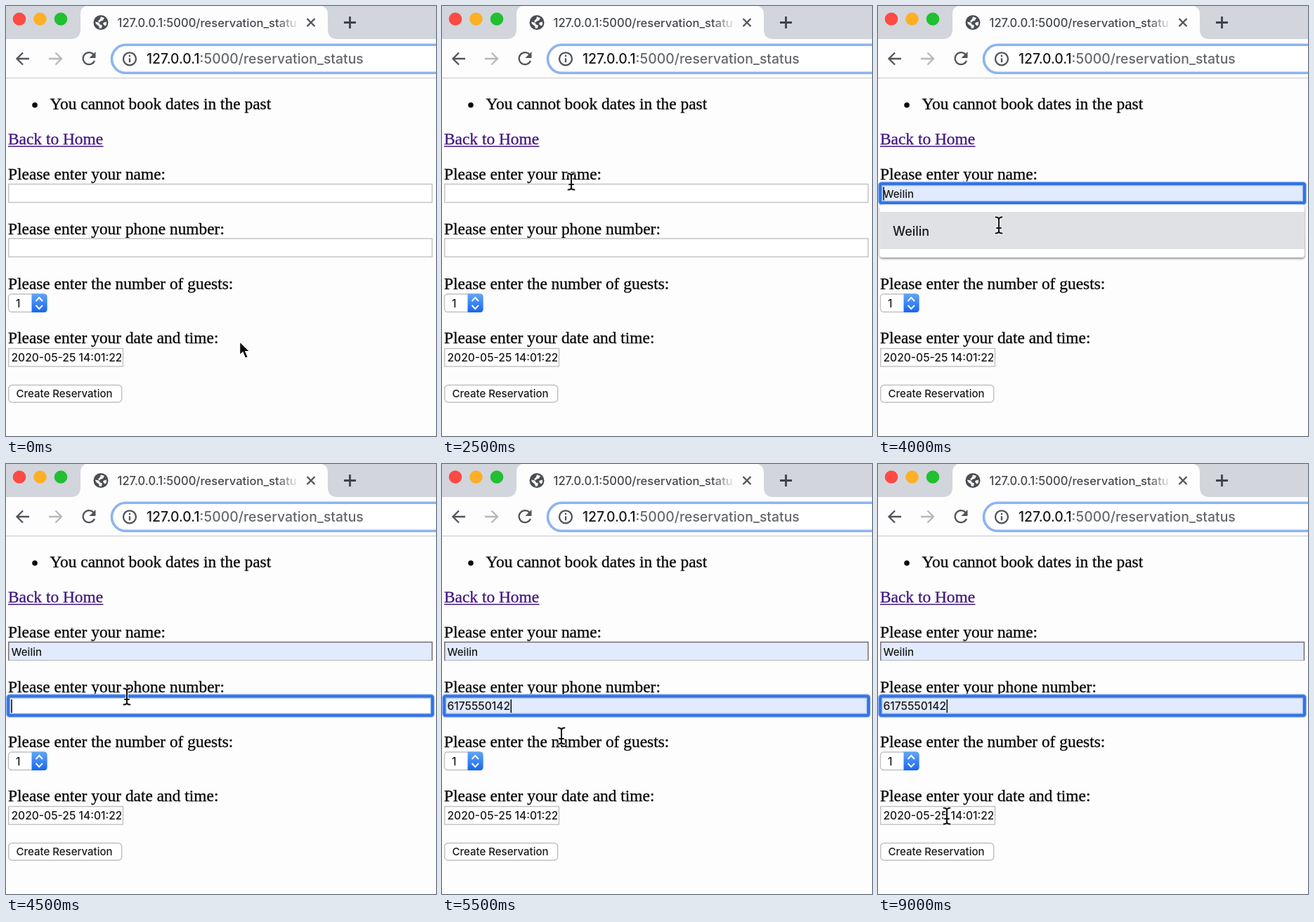
These frames come from a looping animation (612 by 612 pixels, 9500 ms). An HTML page:

```html
<!DOCTYPE html>
<html lang="en">
<head>
<meta charset="utf-8">
<title>Reservation form</title>
<style>
html, body { margin: 0; width: 100%; height: 100%; overflow: hidden; background: #fefdfe; }
svg { display: block; width: 612px; height: 612px; }
text { white-space: pre; }
.serif { font: 23.4px "Liberation Serif", Times, serif; fill: #0a0a0a; stroke: #0a0a0a; stroke-width: .35; }
.serif .link { fill: #431a80; stroke: #431a80; }
.sans { font: 500 15px Inter, Roboto, sans-serif; fill: #1a1a1c; }
.digits { font-size: 15.6px; }
.box { fill: #fff; stroke: #c0c0c4; stroke-width: 1.4; }
.line { fill: none; stroke: #515459; stroke-width: 2.3; }
.caret { stroke: #111; stroke-width: 1.6; }
.ring { fill: none; stroke: #3573e2; stroke-width: 4; }
.halo { fill: none; stroke: #9fbef5; stroke-width: 6.4; }
</style>
</head>
<body>
<svg viewBox="0 0 612 612">
  <defs>
    <linearGradient id="blue" x2="0" y2="1">
      <stop stop-color="#62a6f8"/><stop offset="1" stop-color="#1767ef"/>
    </linearGradient>
    <linearGradient id="fade">
      <stop stop-color="#fdfdfe" stop-opacity="0"/><stop offset="1" stop-color="#fdfdfe"/>
    </linearGradient>
    <filter id="shadow" x="-5%" y="-20%" width="110%" height="150%">
      <feDropShadow dx="0" dy="1.5" stdDeviation="1.8" flood-opacity=".5"/>
    </filter>
    <clipPath id="dateClip"><path d="M5 488H164V513H5z"/></clipPath>
    <path id="beamShape" d="M-4.500-11.500Q0-11.500 0-8Q0-11.500 4.500-11.500M0-8.500V8.500M-4.500 11.500Q0 11.500 0 8Q0 11.500 4.500 11.500M-3 4H3"/>
  </defs>

  <!-- Browser window -->
  <path fill="#d2d5dc" d="M0 0H612V47H0z"/>
  <path fill="#fdfdfe" d="M0 47H92Q106 47 106 33V12Q106 3 113 0H450Q458 3 458 12V33Q458 47 472 47H612V102H0z"/>
  <path stroke="#d4d5d8" stroke-width="1.6" d="M0 102.5H612"/>
  <circle cx="19" cy="18.5" r="9.3" fill="#fc4a44"/>
  <circle cx="48.5" cy="18.5" r="9.3" fill="#fdb025"/>
  <circle cx="78" cy="18.5" r="9.3" fill="#20c030"/>
  <g transform="translate(135 23.5)">
    <circle r="10.5" fill="#4a4e53"/>
    <path fill="#fdfdfe" d="M-8-1L-3 0L-1 3L2 4L1 8L-2 8.3L-3 5L-7 2zM0-8.3L5-6.5L3-3L0-2L-2 0L-4-2L-1-5zM4 0L8-1L8 3L6 5L3 2z"/>
  </g>
  <text class="sans" x="158.500" y="29.5" style="font-size:16.6px;fill:#45484d">127.0.0.1:5000/reservation_statu</text>
  <path fill="url(#fade)" d="M385 8H418V40H385z"/>
  <path fill="#fdfdfe" d="M417.500 8H426V40H417.500z"/>
  <path class="line" d="M428.500 18L439.500 29M439.500 18L428.500 29"/>
  <path class="line" style="stroke:#3f4246;stroke-width:2.8" d="M481 23.500H498M489.500 15V32"/>
  <path class="line" d="M33 75H16M24 66.500L15.500 75L24 83.500"/>
  <path class="line" style="stroke:#b6b8bb" d="M61 75H78M70.500 66.500L79 75L70.500 83.500"/>
  <path class="line" d="M124.500 69A8.500 8.500 0 1 0 126 78"/>
  <path fill="#515459" d="M127.500 65V74H118.500z"/>
  <rect x="150.500" y="55.300" width="520" height="40" rx="20" fill="#fff" stroke="#8bb4f3" stroke-width="3.600"/>
  <circle class="line" cx="176" cy="75.300" r="9"/>
  <path class="line" d="M176 74.300V80.300M176 69.800V72.300"/>
  <text class="sans" x="200" y="82" style="font-size:19.4px">127.0.0.1<tspan fill="#65686d">:5000/reservation_status</tspan></text>

  <!-- Page -->
  <circle cx="41" cy="141" r="3.800" fill="#0a0a0a"/>
  <g class="serif">
    <text x="62.500" y="147">You cannot book dates in the past</text>
    <text x="3" y="197" class="link">Back to Home</text>
    <text x="3" y="247">Please enter your name:</text>
    <text x="3" y="325">Please enter your phone number:</text>
    <text x="3" y="402.500">Please enter the number of guests:</text>
    <text x="3" y="480">Please enter your date and time:</text>
  </g>
  <path stroke="#431a80" stroke-width="1.500" d="M3 199.700H138.500"/>

  <g class="sans">
    <rect class="box" x="3.500" y="410" width="54.500" height="25.500" rx="4.500"/>
    <path fill="url(#blue)" d="M36.500 409.500H54Q58.500 409.500 58.500 414V431.500Q58.500 436 54 436H36.500z"/>
    <path class="line" style="stroke:#fff;stroke-width:1.900" d="M42.500 420L47.300 415L52 420M42.500 426L47.300 431L52 426"/>
    <text x="14" y="428.500" class="digits">1</text>
    <rect class="box" x="3.700" y="487.500" width="162.800" height="25.500"/>
    <text x="7.500" y="506.300" class="digits" clip-path="url(#dateClip)">2020-05-25 14:01:22</text>
    <rect class="box" x="3.700" y="539.500" width="161" height="24.500" rx="5"/>
    <text x="14.500" y="557.300">Create Reservation</text>
  </g>
  <g id="fields" class="sans"></g>

  <!-- Pointers -->
  <path id="arrow" fill="#0b0b0b" stroke="#fff" stroke-width="1.500" d="M0 0V19.500L4.500 15.500L8 24L12 22.300L8.500 14.200H14.500z"/>
  <g id="beam" fill="none" stroke-linecap="round">
    <use href="#beamShape" stroke="#fff" stroke-opacity=".8" stroke-width="4"/>
    <use href="#beamShape" stroke="#111" stroke-width="2"/>
  </g>
</svg>
<script>
const STEP = 500, STEPS = 19;
const NAME = "Weilin", PHONE = "6175550142";
const NAME_Y = 253.5, PHONE_Y = 331;

// Pointer places, one per step from the fifth on
const path = [
  [184, 250], [173, 262], [172, 268], [172, 312], [172, 331], [171, 388], [170, 387],
  [150, 470], [136, 497], [124, 503.5], [115, 505], [108, 505], [102, 503], [98, 501]
];
const caretOn = new Set([6, 8, 9, 10, 11, 13, 15, 18]);
const get = id => document.getElementById(id);
const place = (el, x, y) => el.setAttribute("transform", `translate(${x} ${y})`);

function field(y, text, focused, caretX, type) {
  const fill = text ? "#e1ebfd" : "#fff";
  let out = `<rect class="box" x="3.7" y="${y}" width="602.8" height="26" style="fill:${fill}"/>`;
  if (text && !focused) {
    out += `<path d="M3.7 ${y + 26}V${y}H606.5V${y + 26}" fill="none" stroke="#77747a" stroke-width="1.5"/>`;
  }
  if (focused) {
    for (const c of ["halo", "ring"]) {
      out += `<rect class="${c}" x="3.2" y="${y - .5}" width="603.8" height="27.2" rx="2"/>`;
    }
  }
  out += `<text class="${type}" x="7.5" y="${y + 19.2}">${text}</text>`;
  if (caretX) out += `<path class="caret" d="M${caretX} ${y + 4}V${y + 23}"/>`;
  return out;
}

function menu(y, text) {
  return `<rect x="2.5" y="${y + 29}" width="604.5" height="75.500" rx="4" fill="#fff" filter="url(#shadow)"/>
    <path fill="#dfe1e5" d="M2.500 ${y + 39.5}H607V${y + 92.5}H2.500z"/>
    <text x="21" y="${y + 73.5}" style="font-size:18px">${text}</text>`;
}

function show(step) {
  const onName = step >= 6 && step <= 8, onPhone = step >= 9;
  const name = step >= 8 ? NAME : "", phone = step >= 10 ? PHONE : "";
  const blink = caretOn.has(step);
  let out = field(NAME_Y, name, onName, onName && blink && 8, "") +
    field(PHONE_Y, phone, onPhone, onPhone && blink && (step > 10 ? 98.3 : 8), "digits");
  if (step === 8) out += menu(NAME_Y, NAME);
  if (step === 10) out += menu(PHONE_Y, PHONE);
  get("fields").innerHTML = out;

  const spot = path[step - 5];
  place(get("arrow"), spot ? -99 : 332.5, 477.5);
  place(get("beam"), ...(spot || [-99, 0]));
}

const start = performance.now();
let last = -1;
function tick() {
  const step = Math.floor((performance.now() - start) / STEP) % STEPS;
  if (step !== last) show(last = step);
  requestAnimationFrame(tick);
}
tick();
</script>
</body>
</html>
```
